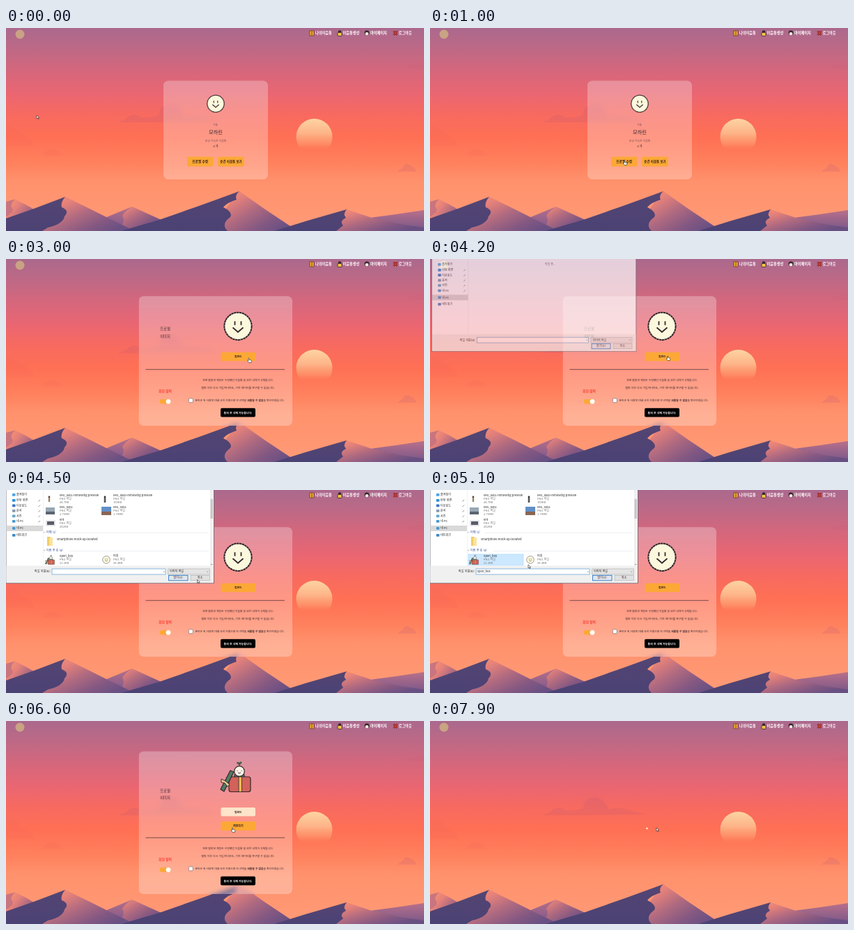
Recreate the animation shown at these times as an HTML page. Size 600 by 291 pixels, loop 8000 ms.

```html
<!DOCTYPE html>
<html lang="ko">
<head>
<meta charset="utf-8">
<title>프로필 수정</title>
<style>
  html, body { margin: 0; width: 100%; height: 100%; overflow: hidden; background: #f0705f; }
  svg { display: block; width: 100vw; height: 100vh; }
  text { font-family: 'Noto Sans CJK KR', 'Noto Sans CJK', 'Noto Sans', sans-serif; white-space: pre; }
</style>
</head>
<body>
<svg id="stage" viewBox="0 0 600 291" preserveAspectRatio="none"></svg>
<script>
const stage = document.getElementById('stage');

// ---------- markup helpers ----------
const text = (x, y, size, str, { fill = '#3f2a30', anchor = 'middle', weight = 400, id = '' } = {}) =>
  `<text ${id && `id="${id}"`} x="${x}" y="${y + size * 0.36}" font-size="${size}" fill="${fill}"
    text-anchor="${anchor}" font-weight="${weight}">${str}</text>`;
const rect = (x, y, w, h, fill, extra = '') =>
  `<rect x="${x}" y="${y}" width="${w}" height="${h}" fill="${fill}" ${extra}/>`;
const circle = (x, y, r, fill, extra = '') =>
  `<circle cx="${x}" cy="${y}" r="${r}" fill="${fill}" ${extra}/>`;
const path = (d, fill, extra = '') => `<path d="${d}" fill="${fill}" ${extra}/>`;
const line = (d, color, width) => path(d, 'none', `stroke="${color}" stroke-width="${width}"`);
const button = (x, y, w, h, fill, label, size, id = '', color = '#2b1a16') =>
  rect(x, y, w, h, fill, `rx="2" ${id && `id="${id}"`}`) +
  text(x + w / 2, y + h / 2, size, label, { weight: 700, fill: color });
const gradient = (id, stops, direction = 'x2="0" y2="1"') =>
  `<linearGradient id="${id}" ${direction}>${stops.map(([at, color, alpha = 1]) =>
    `<stop offset="${at}" stop-color="${color}" stop-opacity="${alpha}"/>`).join('')}</linearGradient>`;
// Frosted card: the blurred landscape under a translucent white sheet.
const glass = (id, x, y, w, h) => `
  <clipPath id="${id}Clip">${rect(x, y, w, h, '#000', `id="${id}Edge" rx="7"`)}</clipPath>
  <g clip-path="url(#${id}Clip)">
    <use href="#landscape" filter="url(#frost)"/>
    ${rect(x, 0, w, 291, '#fff', 'opacity=".28"')}
  </g>`;

const ORANGE = '#fca836', CREAM = '#fde4cb', INK = '#33282c';

const defs = `<defs>
  <filter id="frost" filterUnits="userSpaceOnUse" x="0" y="0" width="600" height="291">
    <feGaussianBlur stdDeviation="3"/>
  </filter>
  ${gradient('sky', [[0, '#ab698d'], [.1, '#bd6986'], [.2, '#d3677d'], [.32, '#e96672'],
    [.43, '#f86a5f'], [.54, '#ff7054'], [.66, '#ff805d'], [.76, '#ff926d'], [1, '#ff9a76']])}
  ${gradient('sunlight', [[0, '#fed3a2'], [.4, '#fdb488'], [.7, '#fe9169', .8], [.87, '#ff7c5c', 0]])}
  ${gradient('slope', [[0, '#ff986f'], [.3, '#e5817a'], [.55, '#b06a80'], [.8, '#845882'], [1, '#695083']], 'x2="1" y2=".7"')}
  ${gradient('haze', [[0, '#b9708a'], [1, '#77568a']])}
  ${gradient('shade', [[0, '#544573'], [1, '#4b4274']])}
  <g id="smiley">
    ${circle(0, 0, 19.6, '#fbf8dd', `stroke="${INK}" stroke-width="2" stroke-dasharray="3.4 .5"`)}
    ${line('M-4.5-7v5.5M4.5-7v5.5M-7.5 2L0 8.5 7.5 2', INK, 1.8)}
  </g>
  <g id="openBox" stroke="${INK}" stroke-width="1.2" stroke-linejoin="round">
    <path d="M2-15v-3q-4 0-3-3 3 0 3 3 0-4 3-3 0 3-3 3" fill="#62a06c" stroke-width=".8"/>
    ${rect(-5, -4, 14, 6, '#54806b', 'rx="2"')}
    ${circle(2, -8, 7.3, '#fbf3e6')}
    <path d="M-1-9v1M5-9v1M0-6q2 2 4 0" fill="none" stroke-width=".9"/>
    <rect x="-13" y="0" width="31" height="21.5" rx="3" fill="#d2625a"/>
    <rect x="1" y="0" width="4.5" height="21.500" fill="#e8bd56" stroke-width=".8"/>
    <path d="M-25 18L-11-9-6-7-20 21Z" fill="#4f7c62"/>
    <path d="M-18 6l-6-3 0 5 5 1 4 5 3-3Z" fill="#e9c58c" stroke-width=".9"/>
  </g>
</defs>`;

const landscape = `<g id="landscape">
  ${rect(0, 0, 600, 291, 'url(#sky)')}
  <g fill="#b0567e" opacity=".17">
    <path d="M160 135q12-3 16-8 9-6 17 1 10 2 27-3 0-13 12-15 14-3 22 12l3 5q13-4 27 0 12 3 24 7l-90 1Z"/>
    <path d="M562 206q4-4 7-5 4-9 11-4 7 2 9 9Z"/>
    <path d="M574 57q8-6 26-7v9Z" opacity=".4"/>
  </g>
  ${path('M0 140q18 2 22 12 14 3 18 17H0ZM52 183q5-10 14-9 12 1 16 9Z', '#e95a5c', 'opacity=".12"')}
  ${circle(442.5, 156, 26, 'url(#sunlight)')}

  ${path('M0 249L13 245.500 28 253 45 263 55 291H0Z', 'url(#slope)')}
  ${path('M0 249L13 245.500Q6 252 8 257 14 263 0 270Z', '#c8757f')}
  ${path('M181 256L225 276V291H140Z', 'url(#slope)')}
  ${path('M140 273L181 256Q170 264 167 269 171 276 166 283L150 291Z', 'url(#haze)')}
  ${path('M500 275L560 267 600 261V291H500Z', 'url(#haze)')}

  ${path('M85 242L120 259 150 274 185 291H40Z', 'url(#slope)')}
  ${path('M0 273L40 259 85 242Q78 250 80 257 92 262 84 270 82 281 60 286L52 291H0Z', 'url(#shade)')}

  ${path('M335 234L372 260 408 284 420 291H290Z', 'url(#slope)')}
  ${path('M165 291L220 275 280 254 335 234Q328 240 331 246 316 251 312 257 326 264 322 271 308 281 318 291Z', 'url(#shade)')}

  ${path('M489 260L525 272 565 281 600 286V291H450Z', 'url(#slope)')}
  ${path('M385 291L430 277 489 260Q483 267 488 272 478 277 484 283L474 291Z', 'url(#shade)')}
</g>`;

const menuLabel = (x, str) => text(x, 7.2, 5.2, str, { fill: '#fff', anchor: 'start', weight: 700 });
const header = `
  ${circle(20, 9, 6.5, '#c9a384')}
  ${rect(436, 4, 6, 7, '#f2b632', 'stroke="#5a3524" stroke-width=".7"')}${rect(438.4, 4, 1.3, 7, '#b04a34')}
  ${circle(479, 5.5, 2.2, INK)}${rect(476, 6.5, 6, 5, '#efc445', `stroke="${INK}" stroke-width=".8" rx="1"`)}
  ${circle(518, 7, 3.4, INK)}${circle(518, 8.2, 2.3, '#fdeee2')}
  ${line('M556.5 4.5l5 5.5M561.5 4.5l-5 5.5', '#4c2024', 2.6)}
  ${line('M556.5 4.5l5 5.5M561.5 4.5l-5 5.5', '#d13c34', 1.5)}
  ${menuLabel(444, '나의이음통')}${menuLabel(483.5, '이음통생성')}
  ${menuLabel(523, '마이페이지')}${menuLabel(563.5, '로그아웃')}`;

const profileCard = `<g id="profile">
  ${glass('profileGlass', 226, 75.5, 150, 141.5)}
  <use href="#smiley" transform="translate(301 108.5) scale(.62)"/>
  ${text(300.5, 138.5, 3.6, '이름', { fill: '#7a5358' })}
  ${text(301, 149, 7.3, '모하린')}
  ${text(301, 162, 3.9, '생성 가능한 이음통', { fill: '#7a5358' })}
  ${text(301, 169.5, 4, '4 개')}
  ${button(260, 184.5, 37.5, 14, ORANGE, '프로필 수정', 4.7)}
  ${button(304, 184.5, 38, 14, ORANGE, '순간 이음통 보기', 4.5)}
</g>`;

// The upper part hangs from the card top, the lower part from the divider line.
const editCard = `<g id="edit">
  ${glass('editGlass', 190.5, 0, 220.5, 10)}
  <g id="sectionLabel">
    ${text(228.5, -5.5, 5.5, '프로필', { weight: 500 })}${text(228.5, 5, 5.3, '이미지')}
  </g>
  <g id="upper">
    <use id="avatar" href="#smiley" x="333" y="43"/>
    <use id="picture" href="#openBox" x="333" y="36.5"/>
    ${button(308.5, 80.4, 49.5, 12.6, CREAM, '업로드', 3.8, 'upload')}
    <g id="saveRow">${button(308.5, 100.5, 49.5, 13, CREAM, '저장하기', 4, 'save')}</g>
  </g>
  <g id="lower">
    ${line('M200.5 0H400', '#6b4248', .9)}
    <g id="withdraw">
      ${text(228.5, 0, 4.8, '회원 탈퇴', { fill: '#fb3f38', weight: 700 })}
      ${rect(220.5, 11.7, 16, 6.6, ORANGE, 'id="track" rx="3.3"')}
      ${circle(224, 15, 3.4, '#fff', 'id="knob"')}
    </g>
    <g id="consent">
      ${text(333, 15, 3.85, '한번 탈퇴한 계정은 수정했던 이음통 및 모든 내역이 삭제됩니다.')}
      ${text(333, 26.3, 3.95, '탈퇴 이후 다시 가입하더라도, 기억 데이터를 복구할 수 없습니다.')}
      ${rect(262.3, 41.5, 6, 6, '#fff', 'rx="1" stroke="#806a70" stroke-width=".7"')}
      ${text(271.5, 44.7, 3.8, '본인은 위 사항에 대해 숙지 하였으며 위 선택을 <tspan font-weight="700">되돌릴 수 없음</tspan>을 확인하였습니다.', { anchor: 'start' })}
      ${button(308, 55.5, 50, 12.6, '#000', '동의 후 삭제 가능합니다.', 3.95, '', '#fff')}
    </g>
  </g>
</g>`;

// ---------- file dialog ----------
const label = (x, y, str, fill = '#222', id = '') => text(x, y, 4.1, str, { anchor: 'start', fill, id });
const file = (x, y, name, size) =>
  label(x, y, name) + label(x, y + 5, 'PNG 파일', '#777') + label(x, y + 10, size, '#777');
const heading = (y, str, lineStart) =>
  line(`M54 ${y - .8}l1 1 1-1`, '#555', .5) + label(58, y, str, '#26408f') +
  rect(lineStart, y, 291 - lineStart, .4, '#d5d9e4');
const places = [['즐겨찾기', 7, '#4aa3e8'], ['바탕 화면', 15, '#2d8fd8'], ['다운로드', 22.5, '#3977c4'],
  ['문서', 30, '#8898aa'], ['사진', 37.5, '#5fa6c9'], ['내 PC', 45, '#4a98d0'],
  ['내 PC', 55, '#4a98d0'], ['네트워크', 65, '#3d88c8']];
const fileDialog = `<g id="dialog">
  ${rect(0, -3, 298.5, 136.5, '#fff', 'stroke="#6d6670" stroke-width=".9"')}
  ${rect(.5, 51, 52.5, 8, '#d9d9d9')}
  ${rect(53, 0, .4, 108, '#ddd')}
  ${places.map(([name, y, color], i) => rect(9, y - 2, 4.5, 3.8, color, 'rx=".8"') + label(15, y, name) +
    (i > 0 && i < 6 ? line(`M46.5 ${y + 1.5}l2.5-2.5`, '#888', .9) : '')).join('')}
  <g id="busy">${label(165, 6, '작업 중...', '#666')}</g>
  <g id="files">
    ${circle(62, 10, 1.4, '#5b4436')}${rect(60.8, 11, 2.4, 6, '#9a8468')}
    ${file(77, 7.5, 'IMG_8451-removebg-preview', '44.7KB')}
    ${circle(142, 10, 1.4, '#333')}${rect(140.7, 11, 2.6, 7, '#555')}
    ${file(154, 7.5, 'IMG_8845-removebg-preview', '156KB')}
    ${rect(57, 25, 13, 10, '#98a7b3')}${rect(57, 31, 13, 4, '#5a6470')}
    ${file(77, 25, 'IMG_8451', '2.70MB')}
    ${rect(137, 24, 14, 12, '#618fc7')}${rect(137, 31, 14, 5, '#8b6654')}
    ${file(154, 25, 'IMG_9451', '1.79MB')}
    ${rect(57, 43, 14, 9, '#e6e8ec')}${rect(59, 45, 10, 5, '#585c66')}
    ${file(77, 42.5, 'ent', '282KB')}
    ${heading(61, '어제 (1)', 78)}
    ${path('M59 67h4l1 1.5h3V80h-8Z', '#f3cd66')}${rect(62, 69, 5, 11, '#fbe29c')}
    ${label(73, 71, 'smartphone-mock-up-isolated')}
    ${heading(87, '이번 주 초 (4)', 90)}
    <g id="selection">${rect(55, 92, 79, 16, '#cce8ff', 'stroke="#99d1ff" stroke-width=".5"')}</g>
    <use href="#openBox" transform="translate(64 100) scale(.31)"/>
    ${file(77, 95, 'open_box', '21.2KB')}
    <use href="#smiley" transform="translate(144 100) scale(.27)"/>
    ${file(154, 95, '미리', '28.4KB')}
    ${rect(293, 0, 4.5, 108, '#f0f0f0')}${rect(293.5, 13, 3.5, 28, '#c8c8c8')}
    ${line('M294 106l1.3 1.3 1.3-1.3', '#555', .6)}
  </g>
  ${rect(.5, 108.5, 297.5, 24.7, '#f0f0f0')}
  ${label(41, 117, '파일 이름(N):')}
  ${rect(66, 113, 163, 8, '#fff', 'stroke="#5d9bd3" stroke-width=".7"')}
  ${label(67.5, 117, 'open_box', '#222', 'fileName')}
  ${rect(232.5, 113, 60, 8, '#e4e4e4', 'stroke="#aaa" stroke-width=".6"')}${label(235, 117, '이미지 파일')}
  ${line('M225.5 116.5l1.2 1.2 1.2-1.2M288 116.5l1.2 1.2 1.2-1.2', '#555', .5)}
  ${rect(233.5, 122.3, 27.5, 7.5, '#e1e6ec', 'stroke="#2878c8" stroke-width=".9"')}${text(247, 126, 4.1, '열기(O)')}
  ${rect(265, 122.3, 27.5, 7.5, '#e1e1e1', 'stroke="#adadad" stroke-width=".6"')}${text(278.5, 126, 4.1, '취소')}
</g>`;

const loader = `<g id="loader">${[0, 1, 2].map(i => circle(289.5 + 11 * i, 154, 1.3, '#fff3dc', `id="dot${i}"`)).join('')}</g>`;
const cursor = `<g id="cursor" stroke="#222" stroke-width=".6" stroke-linejoin="round" fill="#fff">
  <path id="arrow" d="M0 0V5L1.2 4 2 5.7 2.9 5.3 2.1 3.7H3.6Z"/>
  <path id="hand" d="M-.6 .4Q0-.4 .6 .4V2.5L3.3 3.1Q4 3.4 3.8 4.3L3.2 6.6H.3L-1.7 4.2Q-1.7 3.3-.6 3.9Z"/>
</g>`;

stage.innerHTML = defs + landscape + header + profileCard + editCard + loader + fileDialog + cursor;

// ---------- motion ----------
const LOOP = 8000, STEP = 100;
const EDIT_OPEN = 1100, TOGGLE = 2000, DIALOG_OPEN = 4200, FILES_LISTED = 4500,
  FILE_PICKED = 5000, DIALOG_CLOSE = 5600, SAVED = 7000;
const pointerPath = [[0, 44, 125], [700, 279, 190], [1400, 279, 190], [1800, 230.5, 201.5], [2300, 230.5, 201.5],
  [3000, 348.5, 142], [3200, 341, 139], [4300, 341, 139], [4900, 85, 98], [5000, 95, 100],
  [5100, 141, 107], [5400, 246, 125], [5800, 246, 125], [6400, 325, 153], [LOOP, 325, 153]];
const layouts = {
  compact:  { top: 70.5, divider: 176,   bottom: 221.5, withdraw: 13.3 },
  expanded: { top: 53.3, divider: 158.3, bottom: 239,   withdraw: 31 },
  picked:   { top: 43.5, divider: 167.3, bottom: 248,   withdraw: 31 },
};

const el = id => document.getElementById(id);
const set = (id, attrs) => { for (const name in attrs) el(id).setAttribute(name, attrs[name]); };
const show = (id, on) => set(id, { visibility: on ? 'inherit' : 'hidden' });
const within = (t, from, to) => t >= from && t < to;
const ramp = (t, from, to) => Math.min(1, Math.max(0, (t - from) / (to - from)));
const move = (id, x, y) => set(id, { transform: `translate(${x} ${y})` });

function pointerAt(t) {
  const next = pointerPath.findIndex(([time]) => time > t);
  const [t0, x0, y0] = pointerPath[next - 1], [t1, x1, y1] = pointerPath[next];
  const u = ramp(t, t0, t1), eased = u * u * (3 - 2 * u);
  return [x0 + (x1 - x0) * eased, y0 + (y1 - y0) * eased];
}

function render(t) {
  const expanded = t >= TOGGLE, picked = t >= DIALOG_CLOSE;
  const { top, divider, bottom, withdraw } = layouts[picked ? 'picked' : expanded ? 'expanded' : 'compact'];

  show('profile', t < EDIT_OPEN);
  show('edit', within(t, EDIT_OPEN, SAVED));
  set('editGlassEdge', { y: top, height: bottom - top });
  move('sectionLabel', 0, (top + divider) / 2);
  move('upper', 0, top);
  move('lower', 0, divider);
  move('withdraw', 0, withdraw);
  show('avatar', !picked);
  show('picture', picked);
  show('saveRow', picked);
  show('consent', expanded);
  set('knob', { cx: 224 + 9 * ramp(t, TOGGLE - 100, TOGGLE + 200) });
  set('track', { fill: expanded ? ORANGE : '#95858a' });
  set('upload', { fill: within(t, 2800, DIALOG_CLOSE) ? ORANGE : CREAM });
  set('save', { fill: t >= 6300 ? ORANGE : CREAM });

  const opening = ramp(t, DIALOG_OPEN - 130, DIALOG_OPEN + 60);
  const scale = 0.945 + 0.055 * opening;
  show('dialog', within(t, DIALOG_OPEN, DIALOG_CLOSE));
  set('dialog', { opacity: opening, transform: `translate(149 67) scale(${scale}) translate(-149 -67)` });
  show('busy', t < FILES_LISTED);
  show('files', t >= FILES_LISTED);
  show('selection', t >= FILE_PICKED);
  show('fileName', t >= FILE_PICKED);

  show('loader', t >= SAVED);
  for (let i = 0; i < 3; i++)
    set('dot' + i, { opacity: Math.max(0, Math.cos(2 * Math.PI * ((t - 7900) / 900 + (2 - i) / 3))) });

  const hand = within(t, 600, EDIT_OPEN) || within(t, 1700, 2400) || within(t, 2800, 4300) || within(t, 6300, SAVED);
  show('hand', hand);
  show('arrow', !hand);
  move('cursor', ...pointerAt(t));
}

const start = performance.now();
function tick() {
  const t = (performance.now() - start) % LOOP;
  render(Math.floor(t / STEP) * STEP);
  requestAnimationFrame(tick);
}
tick();
</script>
</body>
</html>
```
